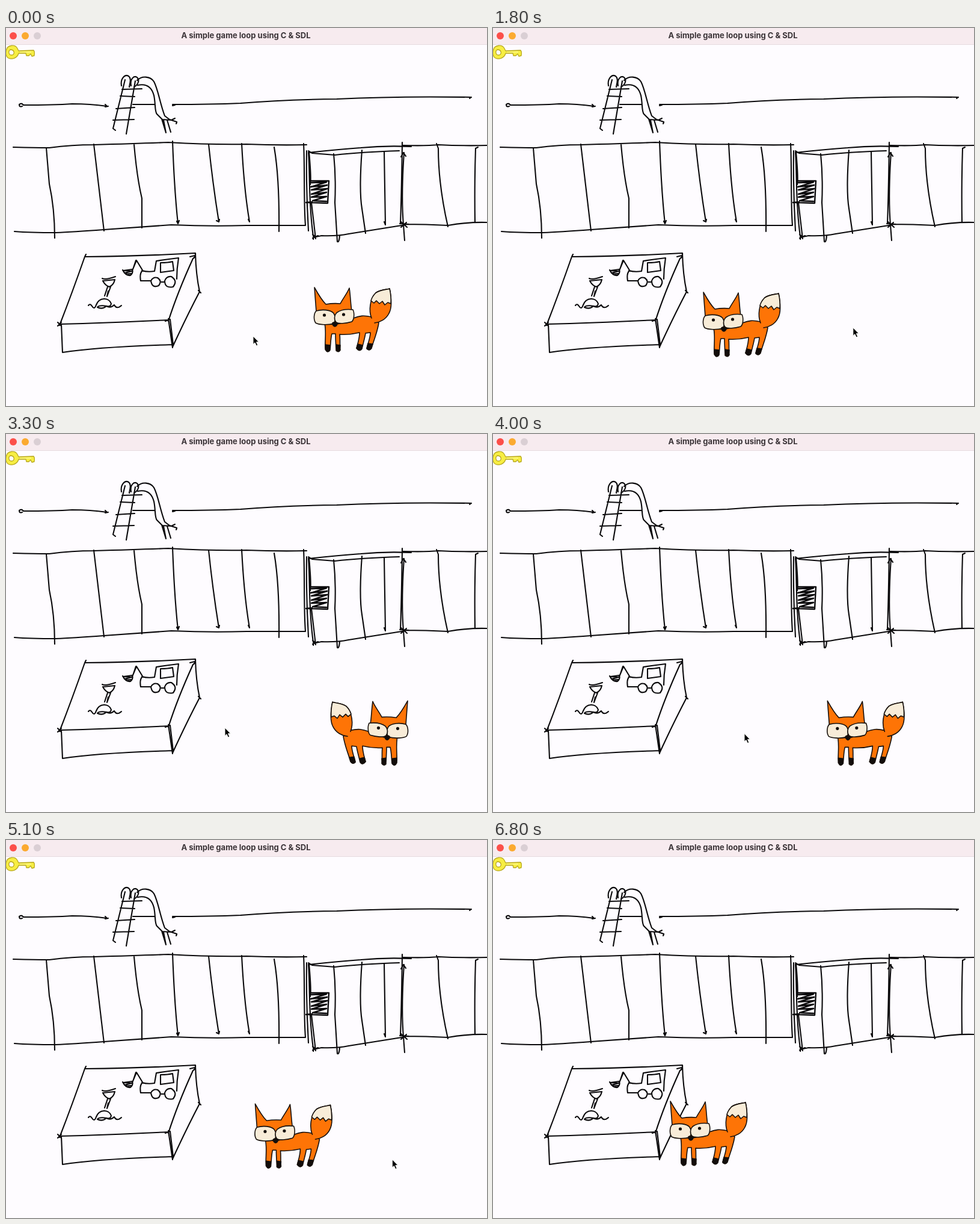
An HTML page that plays this animation: 800 px wide and 628 px high, repeating every 6900 ms.

```html
<!DOCTYPE html>
<html lang="en">
<head>
<meta charset="utf-8">
<title>A simple game loop using C &amp; SDL</title>
<style>
  html, body { margin: 0; height: 100%; overflow: hidden; background: #fefcff; }
  svg { display: block; width: 100vw; height: 100vh; }
  .ink { fill: none; stroke: #0b0a0c; stroke-width: 2.1; stroke-linecap: round; stroke-linejoin: round; }
  .fox { fill: #fe7406; stroke: #17100c; stroke-width: 1.6; stroke-linecap: round; stroke-linejoin: round; }
  .cream { fill: #f8ecd8; }
  .black { fill: #120d0b; }
  text { font: 700 13px Inter, "Liberation Sans", sans-serif; fill: #3a3337; text-anchor: middle; }
</style>
</head>
<body>
<svg viewBox="0 0 800 628">
  <rect width="800" height="628" fill="#fefcff"/>
  <rect width="800" height="27" fill="#f7ebef"/>
  <path d="M0 27.5H800" stroke="#e6dbdf"/>
  <circle cx="12" cy="13" r="6" fill="#fc4f4a"/>
  <circle cx="32" cy="13" r="6" fill="#fbaa30"/>
  <circle cx="52" cy="13" r="6" fill="#dacfd4"/>
  <text x="399" y="17.3">A simple game loop using C &amp; SDL</text>

  <g id="key" fill="#f7ee43" stroke="#b9a91f" stroke-width="1.3" stroke-linejoin="round">
    <path fill-rule="evenodd" d="M1 35C3 29 15 26 19 34L21 38L46 37Q48 39 47 46L43 47L41 43L38 46L34 46L33 42L21 42C19 50 10 53 4 50C-1 47-1 40 1 35ZM7 36C3 39 5 45 9 45C15 45 15 36 7 36Z"/>
    <path d="M23 40H42" stroke="#fffb9a"/>
  </g>

  <g class="ink">
    <!-- horizon and slide -->
    <path d="M27 130Q22 132 22 127Q26 124 29 128Q80 128 110 126Q140 126 168 130L165 127M165 131L170 130M277 127L281 128L277 129M277 127Q340 127 390 125Q460 119 550 118Q650 113 774 115L771 117"/>
    <path d="M192 96C190 85 197 76 204 80C209 84 206 92 205 98M208 96C206 86 212 78 218 82C224 89 217 96 213 98"/>
    <path d="M198 86L178 167L182 170M215 88L200 176M193 102L226 101M190 113L214 114M183 134L214 132M178 153L213 152M211 127L247 127"/>
    <path d="M218 87C226 79 240 80 246 89C253 102 256 125 264 146L272 152L284 156Q284 158 283 159M219 95C233 92 242 97 246 112C249 126 247 138 251 143L260 152L275 153L281 150M259 151L266 174L262 153M268 153L274 173"/>
    <!-- fence -->
    <path d="M12 198Q50 199 72 199Q110 194 146 194Q220 192 270 190Q340 194 400 193Q450 195 500 194M14 338Q40 340 83 340Q110 339 163 335Q230 330 275 327Q340 330 400 328L497 328"/>
    <path d="M67 199L72 259Q81 300 81 349M146 193Q154 260 163 337M213 194Q218 250 226 283L226 332M277 188Q280 270 286 325L284 321M286 325L288 320M337 193Q344 260 354 322L350 320M354 322L355 318M392 192Q396 270 405 322L403 318M446 198Q455 250 454 338"/>
    <!-- gate -->
    <path d="M495 192C497 230 495 290 498 328M500 204Q499 270 503 337M503 206C506 250 503 290 511 346M504 206Q508 250 506 260M508 290L515 350M503 207Q550 202 590 199Q630 195 674 197M503 204L509 208L547 211Q590 206 654 204M510 343L515 347L525 345Q550 346 570 342Q620 334 664 327M512 346L511 351M519 345L510 349"/>
    <path d="M545 209Q549 250 547 290L551 355Q554 357 555 345M592 203Q587 270 592 300L598 341M629 206Q630 270 631 327L629 322M659 190Q658 270 656 325M662 207Q657 280 661 327L663 353M661 207L657 214M661 207L665 213"/>
    <path d="M655 325L670 326M657 322L667 331M666 323L657 331M660 195Q700 196 719 194Q760 196 800 195M660 326Q700 326 735 328Q770 322 800 323M716 192L719 200Q719 260 735 330M785 198L781 200Q779 260 780 322"/>
    <path d="M506 254L537 254L535 291L503 290M499 290L509 289M508 257L533 256L507 264L534 261L508 269L534 267L508 276L533 273L508 281L533 280L510 287L533 288" stroke-width="2.4"/>
    <!-- sandbox -->
    <path d="M133 376L131 380Q230 379 315 374Q316 380 311 383Q285 440 270 487M131 380Q110 440 89 494M86 489L92 495M86 495L92 489M89 492Q170 490 270 485L265 487M92 492L94 539Q150 530 277 526M270 483L277 531M273 484L278 526M315 375Q316 410 322 438Q300 480 277 530M320 436L324 440M306 380L314 378"/>
    <!-- digger -->
    <path d="M194 402Q199 412 207 411Q212 407 210 401L195 403L209 404L197 407L208 408L201 410M210 403L217 386L228 404M216 386L212 398M226 403Q236 406 247 404L250 387Q270 384 287 382Q284 400 284 417M226 404Q222 409 224 420L241 420M257 390Q270 390 277 388L279 403L257 406ZM258 422L264 422"/>
    <path d="M241 420Q245 413 252 415Q260 420 254 428Q243 433 241 420M264 420Q267 412 275 413Q286 420 278 430Q264 433 264 420"/>
    <!-- spade -->
    <path d="M160 416Q165 419 182 413M162 420L181 418M161 420Q165 428 172 430Q179 427 181 418M169 430L164 445M174 430L168 446L170 437M137 461Q140 457 143 462Q147 469 150 460C155 447 171 447 175 458Q174 464 167 462Q155 460 152 464Q160 468 167 462Q174 466 180 460Q184 468 192 461"/>
  </g>

  <defs>
    <g id="head">
      <path d="M516 471L513 431C518 440 526 453 532 459Q544 457 556 458C560 450 568 440 571 432C573 445 573 457 575 470L566 488L547 493L528 490Z"/>
      <path class="cream" d="M516 470C526 467 540 468 545 474C549 480 548 487 545 491C535 494 520 493 515 490C511 484 512 474 516 470Z"/>
      <path class="cream" d="M550 473C558 467 568 467 577 468C580 474 579 485 575 488C565 491 553 492 549 489C545 484 546 477 550 473Z"/>
      <path class="black" d="M543 490Q547 487 551 490Q551 495 547 496Q543 495 543 490Z"/>
      <circle class="black" cx="529.5" cy="477" r="1.8"/>
      <circle class="black" cx="561.5" cy="476" r="1.8"/>
    </g>
  </defs>

  <g id="fox" class="fox">
    <g id="stand" transform="translate(-575 -485)">
      <path d="M530 491C533 505 530 520 531 534Q535 541 539 535C540 525 540 515 542 508L548 508C548 520 549 530 549 536Q553 540 556 535C555 525 556 515 555 509Q572 510 588 506C588 516 585 524 583 532Q588 538 592 533C594 524 597 514 598 507L606 506C606 515 602 523 600 533Q604 537 608 532C611 520 617 508 620 490L608 480C595 477 588 478 578 482Z"/>
      <path d="M608 482C603 470 605 450 615 440C624 434 633 435 638 433C641 448 642 465 637 474C632 484 622 489 613 490"/>
      <path class="cream" d="M607 453L612 457L616 453L621 458L626 454L630 460L635 456L640 458Q641 446 638 433C633 435 624 434 615 440Q609 446 607 453Z"/>
      <path class="black" d="M531 526L539 527L538 536Q534 540 532 535ZM549 526L556 527L555 535Q552 539 550 535ZM585 525L593 527L591 534Q587 538 583 532ZM602 524L610 525L607 533Q604 537 600 532Z"/>
      <use href="#head"/>
    </g>
    <g id="step" transform="translate(-476 -490)">
      <path d="M428 498C427 508 429 516 432 522L446 541L455 540L440 514L453 514Q468 515 482 511C483 521 475 530 471 541L479 542C484 530 490 522 492 511L502 509C509 516 509 525 508 536L517 537C519 527 513 515 515 508Q519 500 516 494L506 487C494 483 484 484 474 488Z"/>
      <path d="M441 513L430 538L428 545L437 546L454 513"/>
      <path d="M507 488C502 472 514 459 525 456C534 451 541 451 545 449C546 460 545 470 540 478C532 488 521 495 511 494"/>
      <path class="cream" d="M522 457L530 462L528 469L534 467L535 474L539 472L541 477Q547 466 545 449C541 451 534 451 522 457Z"/>
      <path class="black" d="M442 538L450 532L455 540Q453 545 448 544ZM431 538L440 541L437 546Q431 549 428 545ZM473 533L482 536L478 543Q473 545 470 541ZM508 530L517 528L518 537Q513 541 508 537Z"/>
      <use href="#head" transform="translate(-105 5)"/>
    </g>
  </g>

  <path id="cursor" d="M0 0V13.6L3 10.8L5.4 16L7.8 15L5.5 9.8H9.6Z" stroke="#fff"/>
</svg>
<script>
  const LOOP = 6900, TICK = 100;

  // Keys are [time, x, y]; positions are linear between them.
  const foxKeys = [
    [500, 575, 485], [1652, 412, 493], [1892, 412, 493], [3518, 636, 498],
    [3863, 636, 498], [6026, 357, 488],
  ];
  const cursorKeys = [
    [500, 411, 512], [1000, 403, 497], [1300, 403, 497], [1900, 638, 498],
    [2600, 638, 498], [3200, 364, 488], [3850, 364, 488], [4600, 634, 536],
    [4900, 634, 536], [5500, 659, 520], [5800, 659, 520], [6100, 660, 494],
    [6200, 660, 494], [6700, 697, -20],
  ];

  const el = id => document.getElementById(id);
  const fox = el('fox'), stand = el('stand'), step = el('step'), cursor = el('cursor');
  const show = (node, on) => node.setAttribute('display', on ? 'inline' : 'none');

  function at(keys, t) {
    const i = keys.findIndex(k => k[0] > t);
    if (i === 0) return keys[0].slice(1);
    if (i < 0) return keys[keys.length - 1].slice(1);
    const [t0, x0, y0] = keys[i - 1], [t1, x1, y1] = keys[i];
    const p = (t - t0) / (t1 - t0);
    return [x0 + (x1 - x0) * p, y0 + (y1 - y0) * p];
  }

  function draw(now) {
    const t = Math.floor(now % LOOP / TICK) * TICK;
    const facing = t > 1892 && t < 3863 ? -1 : 1;
    const leg = foxKeys.findIndex(k => k[0] > t);
    const walking = leg > 0 && leg % 2 === 1;
    const stepping = walking && (t + 150) % 600 < 300;
    fox.setAttribute('transform', `translate(${at(foxKeys, t)}) scale(${facing} 1)`);
    show(stand, !stepping);
    show(step, stepping);
    cursor.setAttribute('transform', `translate(${at(cursorKeys, t)})`);
    requestAnimationFrame(() => draw(performance.now() - start));
  }

  const start = performance.now();
  draw(0);
</script>
</body>
</html>
```
